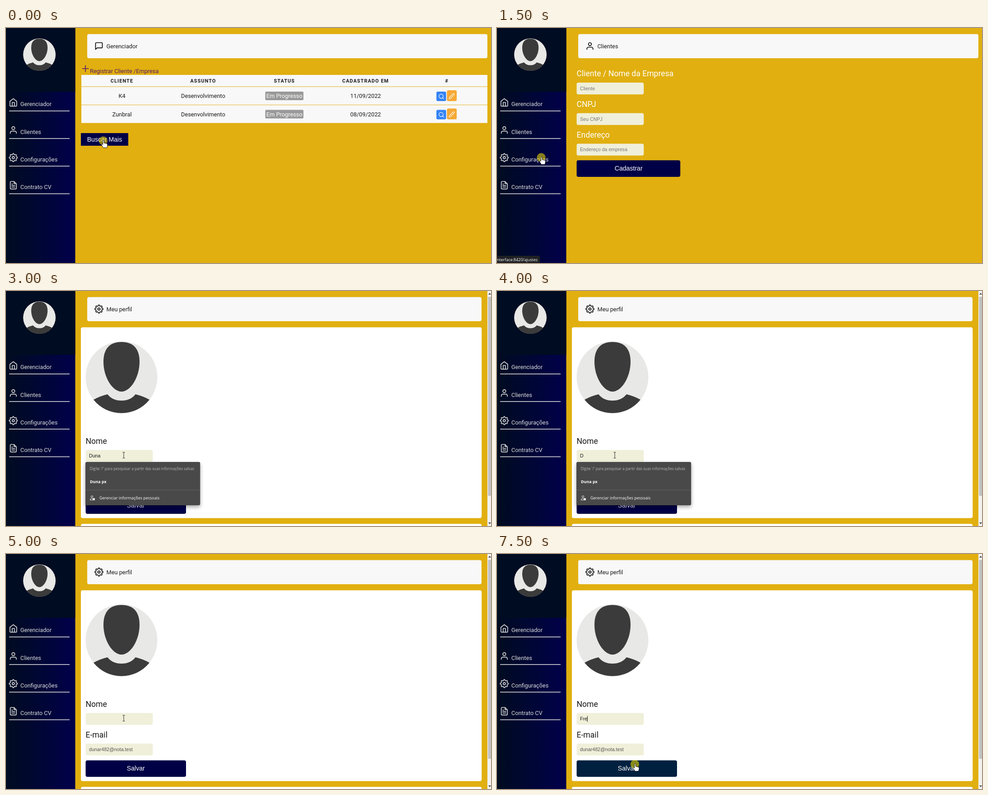
An HTML page for the animation above (8 s loop, 1075x521 px).

```html
<!DOCTYPE html>
<html lang="pt">
<head>
<meta charset="utf-8">
<title>Gerenciador</title>
<style>
  html, body { margin: 0; height: 100%; overflow: hidden; background: #e1af0f; }
  svg { display: block; width: 100vw; height: 100vh; }
  text { font: 12.8px Roboto, sans-serif; fill: #1a1a1a; white-space: pre; }
  .light { fill: #dcdcdc; }
  .white { fill: #fff; }
  .mid { text-anchor: middle; }
  .end { text-anchor: end; }
  .th { font-size: 10.88px; font-weight: 700; letter-spacing: 1.088px; }
  .label { font-size: 17.6px; }
  .btn { font: 14.1px "Liberation Sans", Arial, sans-serif; fill: #fff; text-anchor: middle; }
  .field { font: 10.67px "Liberation Sans", Arial, sans-serif; }
  .hint { fill: #757575; }
  .ui { font: 8.95px "Open Sans", sans-serif; fill: #fff; }
  .bold { font-weight: 700; }
  .icon { fill: none; stroke-width: 2; stroke-linecap: round; stroke-linejoin: round; }
</style>
</head>
<body>
<svg id="stage" viewBox="0 0 1075 521" preserveAspectRatio="none"></svg>
<script>
const STEP = 500, LOOP = 8000;
const NAVY = '#000046', PAPER = '#f8f8f8', CREAM = '#f0efd9';

const text = (x, y, str, cls = '', more = '') => `<text x="${x}" y="${y}" class="${cls}" ${more}>${str}</text>`;
const rect = (x, y, right, bottom, fill, r = 0, more = '') =>
  `<rect x="${x}" y="${y}" width="${right - x}" height="${bottom - y}" rx="${r}" fill="${fill}" ${more}/>`;
const group = (id, body) => `<g id="${id}">${body}</g>`;

function gearPath() {
  const points = [];
  for (let i = 0; i < 96; i++) {
    const a = i / 96 * 2 * Math.PI, r = 9.5 + 1.5 * Math.tanh(1.5 * Math.cos(8 * a));
    points.push((12 + r * Math.cos(a)).toFixed(2) + ' ' + (12 + r * Math.sin(a)).toFixed(2));
  }
  return `M${points.join('L')}Z`;
}
const icons = {
  home: '<path d="M3 9l9-7 9 7v11a2 2 0 0 1-2 2H5a2 2 0 0 1-2-2zM9 22V12h6v10"/>',
  user: '<path d="M20 21v-2a4 4 0 0 0-4-4H8a4 4 0 0 0-4 4v2"/><circle cx="12" cy="7" r="4"/>',
  gear: `<path d="${gearPath()}"/><circle cx="12" cy="12" r="3"/>`,
  file: '<path d="M14 2H6a2 2 0 0 0-2 2v16a2 2 0 0 0 2 2h12a2 2 0 0 0 2-2V8zv6h6M16 13H8M16 17H8M10 9H8"/>',
  chat: '<path d="M21 15a2 2 0 0 1-2 2H7l-4 4V5a2 2 0 0 1 2-2h14a2 2 0 0 1 2 2z"/>',
  plus: '<path d="M12 4v16M4 12h16"/>',
  search: '<circle cx="11" cy="11" r="8"/><path d="M21 21l-4.35-4.35"/>',
  pencil: '<path d="M17 3a2.83 2.83 0 1 1 4 4L7.5 20.5 2 22l1.5-5.5z"/>'
};
// Icon centred on (x, y)
const icon = (name, x, y, color, size = 20) =>
  `<g class="icon" stroke="${color}" transform="translate(${x - size / 2} ${y - size / 2}) scale(${size / 24})">${icons[name]}</g>`;

const avatar = (x, y, r) => `<g transform="translate(${x} ${y}) scale(${r / 79.5})" fill="#3b3b3b">
  <circle r="79.5" fill="#e8e8e6"/>
  <path d="M0-78C27-78 40-62 40-34C40 0 20 32 0 32S-40 0-40-34C-40-62-27-78 0-78Z"/>
  <path d="M-62 50Q-48 42-31 38Q-20 52 0 52T31 38Q48 42 62 50A79.5 79.5 0 0 1-62 50Z"/></g>`;

const header = (name, title, right) =>
  rect(180, 13.5, right, 67, PAPER, 4) + icon(name, 206, 40, '#000') + text(222.5, 44.7, title);
const input = (y, str, cls, more) => rect(176.5, y, 325.3, y + 26.3, CREAM, 4) + text(184, y + 17, str, 'field ' + cls, more);

const menu = [['home', 'Gerenciador'], ['user', 'Clientes'], ['gear', 'Configurações'], ['file', 'Contrato CV']];
const sidebar = rect(0, 0, 153.5, 521, 'url(#night)') + rect(0, 0, 153.5, 141.5, '#000c21') + avatar(74, 59, 36) +
  menu.map(([name, label], i) => {
    const y = 61.2 * i;
    return icon(name, 16.2, 165 + y, '#d8d8d8') + text(31.8, 173.4 + y, label, 'light') +
      rect(7, 183 + y, 141, 184.7 + y, '#cfcfd4');
  }).join('');

const columns = [257, 437, 617, 797, 977];
const row = (y, client, date) => rect(167, y - 20, 1067, y + 19.6, PAPER) +
  rect(574.7, y - 9.5, 659.3, y + 9.5, '#999', 2) +
  [client, 'Desenvolvimento', 'Em Progresso', date].map((s, i) =>
    text(columns[i], y + 4.5, s, i === 2 ? 'mid white' : 'mid')).join('') +
  rect(954, y - 9.5, 975.5, y + 11.5, '#3583f6', 3) + icon('search', 965, y + 1.3, '#fff', 14) +
  rect(977.3, y - 12.5, 999, y + 11.5, '#f6a935', 3) + icon('pencil', 988, y + .5, '#fff', 14);

const dashboard = header('chat', 'Gerenciador', 1067) +
  icon('plus', 176, 90, '#551a6b') + text(186, 100.3, 'Registrar Cliente /Empresa', '', 'style="fill:#551a6b"') +
  rect(167, 104, 1067, 129.5, PAPER) +
  ['CLIENTE', 'ASSUNTO', 'STATUS', 'CADASTRADO EM', '#'].map((s, i) => text(columns[i], 121.2, s, 'th mid')).join('') +
  row(150.5, 'K4', '11/09/2022') + row(191, 'Zunbral', '08/09/2022') +
  rect(166, 233, 271, 261, NAVY) + text(218.5, 252, 'Buscar Mais', 'btn');

const clients = header('user', 'Clientes', 1067) +
  [['Cliente / Nome da Empresa', 'Cliente'], ['CNPJ', 'Seu CNPJ'], ['Endereço', 'Endereço da empresa']].map(([label, hint], i) =>
    text(176.5, 106.7 + 68 * i, label, 'label white') + input(121 + 67.7 * i, hint, 'hint')).join('') +
  rect(176.5, 293.3, 406.3, 330, NAVY, 4) + text(291.7, 315.8, 'Cadastrar', 'btn');

const profile = header('gear', 'Meu perfil', 1054) +
  rect(166, 80.5, 1054.3, 503.5, '#fff', 4) + rect(166, 516.3, 1054.3, 540, '#fff', 4) +
  rect(1067, 0, 1075, 521, '#f1f1f1') + rect(1068.5, 13, 1075, 454, '#c1c1c1') +
  '<path d="M1069 8l3-4 3 4zM1069 513l3 4 3-4z" fill="#505050"/>' + avatar(256, 191, 79.5) +
  text(176.5, 339, 'Nome', 'label') + input(352.4, '', '', 'id="name"') +
  rect(0, 359.3, 1, 372, '#000', 0, 'id="caret"') +
  text(176.5, 406.5, 'E-mail', 'label') + input(420.2, 'dunar482@nota.test', '', 'style="fill:#545454"') +
  rect(176.5, 457.5, 399, 494, NAVY, 4, 'id="save"') + text(287.8, 479.7, 'Salvar', 'btn');

function popup(items) {
  const shift = 30 * (items.length - 1);
  return rect(176, 379, 430.3, 475 + shift, '#494949', 3, 'filter="url(#shadow)"') +
    text(185.5, 397, "Digite '/' para pesquisar a partir das suas informações salvas", 'ui', 'style="font-size:8.25px;fill:#b8b8b8"') +
    items.map((s, i) => text(186, 425.7 + 30 * i, s, 'ui bold')).join('') +
    `<g transform="translate(0 ${shift})">` + rect(176, 440.8, 430.3, 441.6, '#686868') +
    '<g fill="none" stroke="#eee"><circle cx="190.5" cy="456" r="2.1"/><path d="M192 463.5h-5.5v-1.5q0-2 3-2h2"/></g>' +
    rect(192, 459.3, 197, 464, '#eee', 1) + text(207, 462.4, 'Gerenciar informações pessoais', 'ui') + '</g>';
}

const hand = `<path d="M-1.3 1a1.3 1.3 0 0 1 2.6 0v5l5.5 1.2q2 .5 2 2.3v2.5l-1.5 4.5h-7.5l-3.5-5.5
  q-1.3-2 .3-2.6 1-.3 2.1 1.3z" transform="translate(.6 -1)" fill="#fff" stroke="#000" stroke-width=".8"/>`;
const beam = '<path d="M-2.5-6.5h2l.5.5.5-.5h2M-2.5 6.5h2l.5-.5.5.5h2M0-6V6" fill="none" stroke="#222"/>';

stage.innerHTML = `<defs>
  <linearGradient id="night"><stop stop-color="#000c20"/><stop offset="1" stop-color="#00004b"/></linearGradient>
  <filter id="shadow" x="-10%" y="-20%" width="120%" height="150%">
    <feDropShadow dx="0" dy="4" stdDeviation="4" flood-opacity=".35"/></filter></defs>` +
  rect(0, 0, 1075, 521, '#e1af0f') + sidebar +
  group('dashboard', dashboard) + group('clients', clients) + group('profile', profile) +
  group('shortList', popup(['Duna px'])) + group('longList', popup(['Criar ladin page', 'Duna px'])) +
  group('status', rect(-4, 505, 95, 525, '#202124', 3, 'id="statusBox"') + text(90, 516.7, '', 'ui end', 'id="statusText"')) +
  group('cursor', '<circle id="halo" r="9.7" fill="#fae400" opacity=".55"/>' + group('hand', hand) + group('beam', beam));

const el = id => document.getElementById(id);
const show = (id, on) => el(id).setAttribute('display', on ? 'inline' : 'none');
const set = (id, name, value) => el(id).setAttribute(name, value);

const names = ['Dunar', 'Dunar', 'Duna', 'Du', 'D', '', '', '', 'F', 'Fr', 'Fr', 'Fre'];
const pages = ['', 'dashboard', 'customers', 'ajustes'];
const pointer = [[215.5, 250], [90, 171], [95, 230], [98, 287]];
const caretSteps = [5, 9, 12, 13, 14, 15];
el('longList').setAttribute('opacity', .92);

function draw(step) {
  show('dashboard', step < 3);
  show('clients', step === 3);
  show('profile', step > 3);
  show('shortList', step >= 6 && step <= 8);
  show('longList', step === 9);

  const page = pages[step];
  show('status', page);
  if (page) {
    const end = page === 'ajustes' ? 90 : 106;
    el('statusText').textContent = 'interface:8420/' + page;
    set('statusText', 'x', end);
    set('statusBox', 'width', end + 9);
  }

  el('name').textContent = names[step - 4] || '';
  show('caret', caretSteps.includes(step));
  if (step > 3) set('caret', 'x', 183.8 + el('name').getComputedTextLength());
  set('save', 'fill', step === 15 ? '#00203f' : NAVY);

  const pointing = step < 4 || step === 15;
  const [x, y] = pointer[step] || (pointing ? [305.5, 466] : [261, 364]);
  set('cursor', 'transform', `translate(${x} ${y})`);
  show('hand', pointing);
  show('beam', !pointing);
  show('halo', pointing || step === 4);
}

const start = performance.now();
let last = -1;
function tick() {
  const step = Math.floor((performance.now() - start) % LOOP / STEP);
  if (step !== last) draw(last = step);
  requestAnimationFrame(tick);
}
tick();
</script>
</body>
</html>
```
